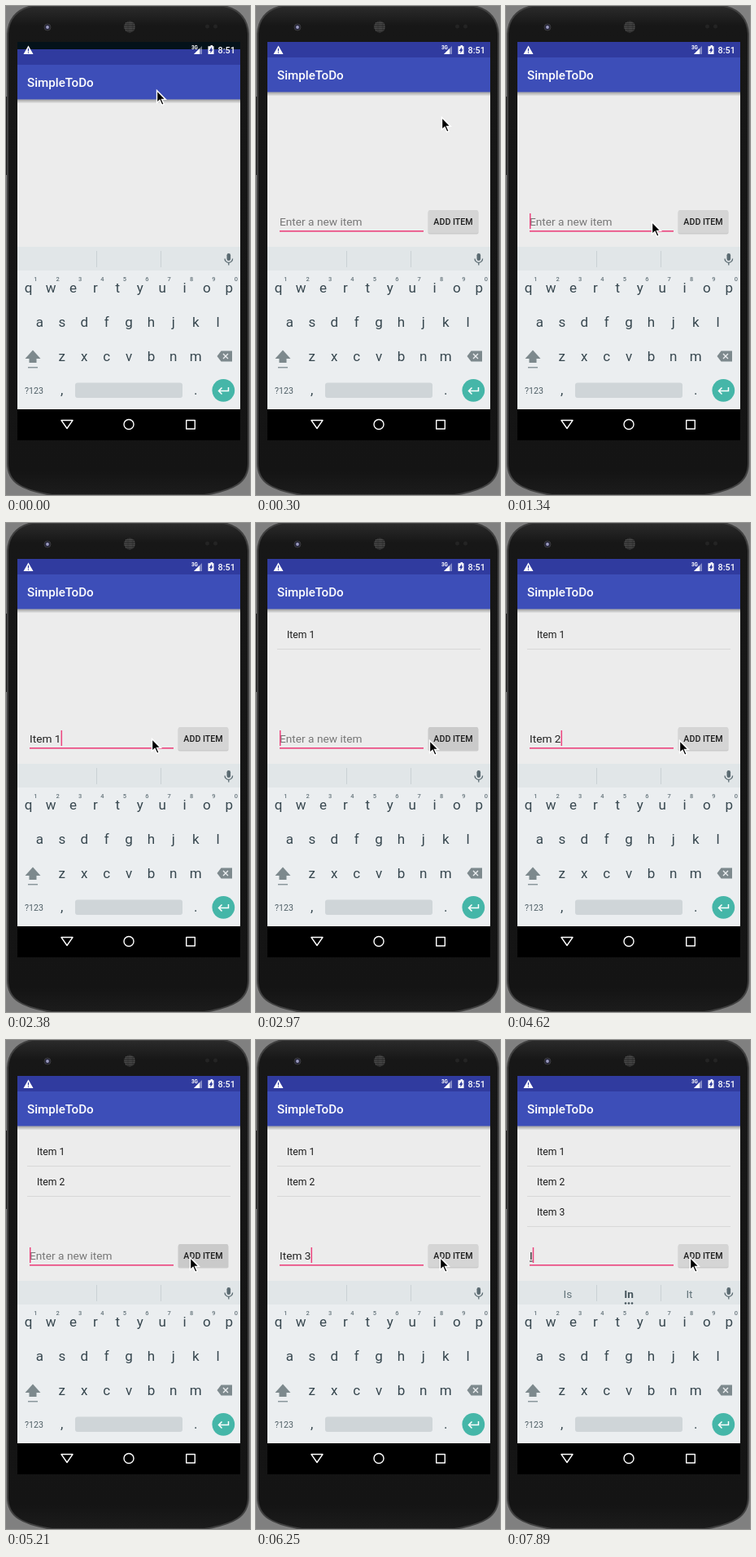
An HTML page that plays this animation: 300x599 px, repeating every 8 s.

```html
<!DOCTYPE html>
<html lang="en">
<head>
<meta charset="utf-8">
<title>To-do list demo</title>
<style>
  html, body { margin: 0; width: 100%; height: 100%; overflow: hidden; background: #808080; }
  svg { display: block; }
  text { font-family: Roboto, sans-serif; white-space: pre; }
  .mid { text-anchor: middle; }
  .bold { font-weight: 500; }
  .key { font-size: 17px; fill: #37474f; text-anchor: middle; }
  .digit { font-size: 7.5px; font-weight: 500; fill: #66757c; text-anchor: middle; }
  .suggestion { font-size: 13.7px; fill: #64747b; text-anchor: middle; }
  .suggestion.main { font-weight: 700; fill: #46555c; }
  .field { font-size: 13.7px; }
  .item { font-size: 12.2px; fill: #1c1c1c; }
</style>
</head>
<body>
<svg width="300" height="599" viewBox="0 0 300 599">
  <defs>
    <linearGradient id="drop" x2="0" y2="1">
      <stop stop-color="#000" stop-opacity=".32"/>
      <stop offset="1" stop-color="#000" stop-opacity="0"/>
    </linearGradient>
    <linearGradient id="body" x2="0" y2="1">
      <stop stop-color="#2b2b2b"/><stop offset=".04" stop-color="#171717"/>
      <stop offset=".95" stop-color="#141414"/><stop offset="1" stop-color="#1c1c1c"/>
    </linearGradient>
    <pattern id="mesh" width="2.4" height="2.4" patternUnits="userSpaceOnUse">
      <rect width="2.4" height="2.4" fill="#222"/><circle cx="1.2" cy="1.2" r=".8" fill="#666"/>
    </pattern>
    <clipPath id="screen"><rect x="14" y="44" width="274" height="488"/></clipPath>
  </defs>

  <!-- Phone -->
  <rect width="300" height="599" fill="#808080"/>
  <rect y="111" width="3" height="96" fill="#222"/>
  <path d="M2 34Q4 6 32 0H268Q296 6 298 34V560C298 584 280 593 244 599H56C20 593 2 584 2 560Z" fill="url(#body)" stroke="#404040" stroke-width="2"/>
  <circle cx="152" cy="25.5" r="7" fill="url(#mesh)"/>
  <circle cx="51" cy="26" r="4" fill="#24243a" stroke="#3b3b3b"/>
  <circle cx="51" cy="26" r="1.9" fill="#9c9cc0"/>
  <g fill="#242424"><circle cx="247.500" cy="25" r="2.500"/><circle cx="257.500" cy="25" r="2.500"/></g>
  <rect x="14" y="44" width="274" height="488" fill="#000"/>

  <g clip-path="url(#screen)">
    <rect x="14" y="60" width="274" height="235" fill="#ececec"/>
    <g id="bars">
      <rect x="14" y="35" width="274" height="9" fill="#04121a"/>
      <rect x="14" y="44" width="274" height="19" fill="#303b9f"/>
      <rect x="14" y="63" width="274" height="42.500" fill="#3d4eb8"/>
      <rect x="14" y="105.500" width="274" height="5" fill="url(#drop)"/>
      <text class="bold" x="26" y="90" font-size="15.2" fill="#fff">SimpleToDo</text>
    </g>

    <!-- Status icons -->
    <g fill="#fff">
      <path d="M27.500 48.500L33.500 59H21.500Z"/>
      <path d="M27.500 52v3.500M27.500 56.500v1.300" stroke="#303b9f" stroke-width="1.200"/>
      <path d="M241 49V59H231Z" fill-opacity=".4"/>
      <path d="M238 52V59H231Z"/>
      <text x="228" y="53.300" font-size="6.300" font-weight="700">3G</text>
      <path d="M250 49.200h1.500v-1.200h2.500v1.200h1.500V59H248.500V49.200Z"/>
      <path d="M253 50.200L249.700 54.900h1.700V58L254.500 53.300h-1.500Z" fill="#303b9f"/>
      <text class="bold" x="260.500" y="58" font-size="10.800">8:51</text>
    </g>

    <g id="list"></g>

    <g id="entry">
      <rect x="29" y="275" width="177" height="1.600" fill="#ec447e"/>
      <text id="input" class="field" x="29" y="268.700"></text>
      <rect id="composing" x="29" y="270.500" height="1" fill="#222"/>
      <rect id="caret" y="254" width="1.500" height="19" fill="#ec447e"/>
      <rect x="211.500" y="251" width="62" height="28.500" rx="2" fill="#000" opacity=".14"/>
      <rect id="button" x="212" y="250" width="61" height="28" rx="1.500"/>
      <text class="mid bold" x="242.500" y="268" font-size="10.650" fill="#1c1c1c">ADD ITEM</text>
    </g>

    <!-- Keyboard -->
    <rect x="14" y="295" width="274" height="199" fill="#ebeef0"/>
    <rect x="14" y="295" width="274" height="29" fill="#e1e6e8"/>
    <path d="M111.500 300V320M190.500 300V320" stroke="#c9d1d4"/>
    <g id="suggestions">
      <text class="suggestion" x="76" y="315.500"></text>
      <text class="suggestion main" x="151" y="315.500"></text>
      <text class="suggestion" x="225.500" y="315.500"></text>
      <g fill="#46555c"><circle cx="147" cy="322.500" r="1.300"/><circle cx="151" cy="322.500" r="1.300"/><circle cx="155" cy="322.500" r="1.300"/></g>
    </g>
    <rect x="271.500" y="303" width="4.600" height="9" rx="2.300" fill="#5b6b72"/>
    <path d="M269 309.500a4.800 4.800 0 0 0 9.600 0M273.800 314.500v3" fill="none" stroke="#5b6b72" stroke-width="1.300"/>
    <g id="keys"></g>
    <path d="M33 421.500L42.500 432H37.500V437H28.500V432H23.500Z" fill="#7d898d"/>
    <rect x="27" y="442" width="12" height="1.500" fill="#8b989d"/>
    <path d="M264.500 422.500H278V435.500H264.500L259.500 429Z" fill="#7d898d"/>
    <path d="M267 426l6 6M273 426l-6 6" stroke="#ebeef0" stroke-width="1.400"/>
    <text class="mid" x="34.500" y="475" font-size="10.650" fill="#4f5f66">?123</text>
    <rect x="85" y="461.500" width="132" height="18.500" rx="3" fill="#cfd5d8"/>
    <circle cx="267.300" cy="470.800" r="13.900" fill="#45b6a8"/>
    <path d="M273.500 467V471.500H262M265.500 467.500L261.500 471.500L265.500 475.500" fill="none" stroke="#fff" stroke-width="1.500"/>

    <!-- Navigation -->
    <rect x="14" y="494" width="274" height="38" fill="#000"/>
    <g fill="none" stroke="#fff" stroke-width="1.400" stroke-linejoin="round">
      <path d="M68 507.500H82L75 517.500Z"/>
      <circle cx="151" cy="512.500" r="6"/>
      <rect x="221.700" y="507.500" width="10.600" height="10.500"/>
    </g>
  </g>

  <path id="pointer" d="M.5 .5V15.500L4 12.300L6.700 18.300L9.200 17.200L6.600 11.400H11.300Z" stroke="#fff" stroke-width="1.400"/>
</svg>

<script>
const LOOP = 8000;
const $ = id => document.getElementById(id);

const listRows = [1, 2, 3].map(n => {
  const y = 104 + 37 * n;
  $("list").insertAdjacentHTML("beforeend",
    `<g><text class="item" x="38" y="${y}">Item ${n}</text>
     <path d="M26 ${y + 13.5}H276" stroke="#d8d8d8"/></g>`);
  return $("list").lastElementChild;
});

const addKeys = (letters, x, y, digits = "") => {
  [...letters].forEach((letter, i) => {
    const cx = x + 27.4 * i;
    $("keys").insertAdjacentHTML("beforeend", `<text class="key" x="${cx}" y="${y}">${letter}</text>` +
      (digits && `<text class="digit" x="${cx + 8.6}" y="337">${digits[i]}</text>`));
  });
};
addKeys("qwertyuiop", 27.7, 351, "1234567890");
addKeys("asdfghjkl", 41.4, 393);
addKeys("zxcvbnm", 68.8, 435);
addKeys(",", 68.8, 476);
addKeys(".", 233.2, 476);

const shortWords = ["Is", "In", "It"];
const longWords = ["It's", "Item", "Items"];
const typed = (text, words = null, composing = false) => ({ text, words, composing, caret: true });
const added = items => ({ ...typed(""), items });

// Each entry changes part of the state from its time on.
const timeline = [
  [0, { ...typed(""), items: 0, shift: 9, entry: false, caret: false, pressed: false, pointer: [185, 103] }],
  [150, { shift: 1, entry: true, pointer: [211, 122] }],
  [300, { shift: 0, pointer: [228, 136] }],
  [440, { caret: true, pointer: [217, 176] }],
  [590, { pointer: [196, 234] }],
  [740, { pointer: [182, 260] }],
  [890, { caret: false, pointer: [179, 264] }],
  [1340, { caret: true }],
  [1640, typed("I", shortWords, true)],
  [1790, typed("It", shortWords)],
  [1940, typed("Item", shortWords)],
  [2080, typed("Item", longWords, true)],
  [2230, typed("Item ", longWords)],
  [2380, typed("Item 1")],
  [2530, { pointer: [200, 266] }],
  [2680, { pointer: [212, 266] }],
  [2830, { caret: false, pressed: true, pointer: [213, 266] }],
  [2970, added(1)],
  [3120, { pressed: false }],
  [3420, typed("I", shortWords, true)],
  [3570, typed("It", shortWords)],
  [3720, typed("Ite", shortWords)],
  [3870, typed("Item", shortWords)],
  [4170, typed("Item", longWords, true)],
  [4320, typed("Item ", longWords)],
  [4620, typed("Item 2")],
  [4770, { pointer: [222, 266] }],
  [4920, { pressed: true, pointer: [226, 266] }],
  [5060, added(2)],
  [5510, { ...typed("I", shortWords, true), pressed: false }],
  [5660, typed("Ite", shortWords)],
  [5800, typed("Item", longWords, true)],
  [5950, typed("Item ", longWords)],
  [6250, typed("Item 3")],
  [6700, { caret: false, pressed: true }],
  [6850, { ...added(3), pressed: false }],
  [7300, { caret: false }],
  [7740, { caret: true }],
  [7890, typed("I", shortWords, true)],
];

const stateAt = time =>
  Object.assign({}, ...timeline.filter(([start]) => start <= time).map(([, change]) => change));

const show = (element, visible) => element.setAttribute("visibility", visible ? "inherit" : "hidden");

function render(time) {
  const state = stateAt(time);
  $("bars").setAttribute("transform", `translate(0 ${state.shift})`);
  $("pointer").setAttribute("transform", `translate(${state.pointer})`);
  $("button").setAttribute("fill", state.pressed ? "#cacaca" : "#d5d5d5");
  listRows.forEach((row, i) => show(row, i < state.items));
  show($("entry"), state.entry);

  const input = $("input");
  input.textContent = state.text || "Enter a new item";
  input.setAttribute("fill", state.text ? "#222" : "#777");
  const width = state.text ? input.getComputedTextLength() : 0;
  $("caret").setAttribute("x", 29 + width);
  show($("caret"), state.caret);
  $("composing").setAttribute("width", width);
  show($("composing"), state.composing);

  show($("suggestions"), state.words);
  if (state.words) state.words.forEach((word, i) => $("suggestions").children[i].textContent = word);
}

const startTime = performance.now();
function tick() {
  render((performance.now() - startTime) % LOOP);
  requestAnimationFrame(tick);
}
tick();
</script>
</body>
</html>
```
